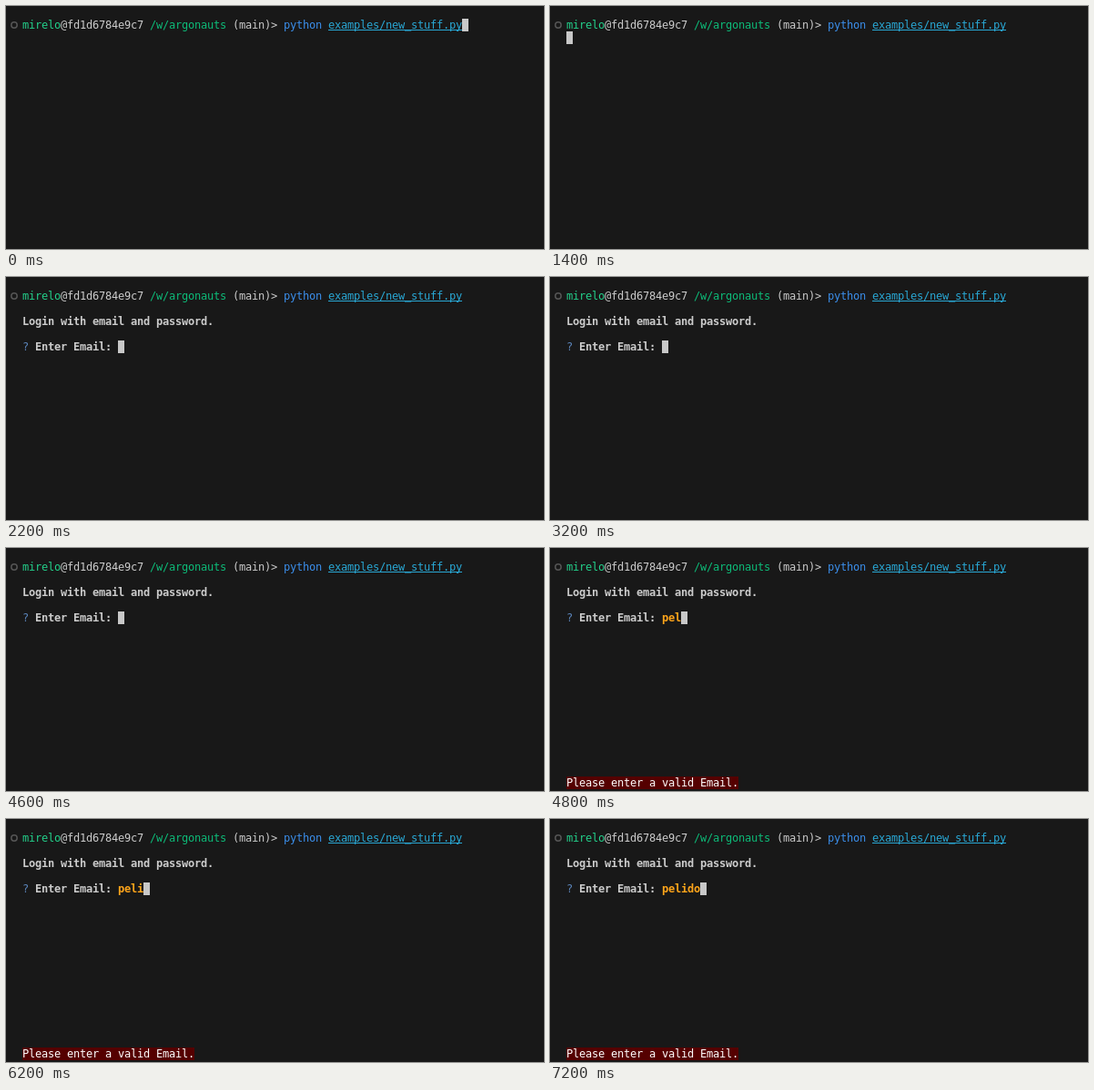
These frames come from a looping animation (591 by 268 pixels, 8000 ms). An HTML page:

```html
<!DOCTYPE html>
<html lang="en">
<head>
<meta charset="utf-8">
<title>Terminal login</title>
<style>
  html, body { margin: 0; width: 100%; height: 100%; overflow: hidden; background: #181818; }
  #dot { position: absolute; left: 5px; top: 17px; }
  #term {
    position: absolute; left: 18px; top: 14px; margin: 0;
    font: 12px/14px "DejaVu Sans Mono", monospace;
    letter-spacing: calc(7px - 1ch); /* snap to a 7px cell */
    color: #ccc; white-space: pre;
  }
  #term > div { position: absolute; left: 0; height: 14px; }
  .user { color: #23d18b; }
  .path { color: #0dbc79; }
  .cmd { color: #3b8eea; }
  .arg { color: #29a8d5; text-decoration: underline 1px; text-underline-offset: 1px; text-decoration-skip-ink: none; }
  .mark { color: #5a83b8; font-weight: normal; }
  #term b i { color: #ffa51a; font-style: normal; }
  #term #error { background: #550000; color: #fff; top: 238px; }
  #term #cursor { width: 7px; background: #c8c8c8; }
</style>
</head>
<body>
<svg id="dot" width="8" height="8"><circle cx="4" cy="4" r="3.2" fill="none" stroke="#555" stroke-width="1.5"/></svg>
<div id="term">
  <div style="top:0"><span class="user">mirelo</span>@fd1d6784e9c7 <span class="path">/w/argonauts</span> (main)&gt; <span class="cmd">python</span> <span class="arg">examples/new_stuff.py</span></div>
  <div id="form" style="top:28px"><b>Login with email and password.

<span class="mark">?</span> Enter Email: <i id="email"></i></b></div>
  <div id="error">Please enter a valid Email.</div>
  <div id="cursor"></div>
</div>
<script>
const LOOP = 8000, CELL_W = 7, CELL_H = 14, INPUT_COL = 15;
// [start in ms, text in the email field]
const typing = [
  [1600, ""], [4800, "pel"], [5000, "peln"], [5200, "pelnd"], [5400, "peln"],
  [5600, "pel"], [6200, "peli"], [6400, "pelid"], [6600, "pelido"]
];
const [form, email, error, cursor] =
  ["form", "email", "error", "cursor"].map(id => document.getElementById(id));

function show(el, on) {
  el.style.visibility = on ? "visible" : "hidden";
}

function moveCursor(col, row) {
  cursor.style.left = col * CELL_W + "px";
  cursor.style.top = row * CELL_H + "px";
}

function draw(t) {
  const step = typing.findLast(([start]) => t >= start);
  const text = step ? step[1] : "";
  show(form, step);
  show(error, text);
  if (email.textContent !== text) email.textContent = text;
  if (step) moveCursor(INPUT_COL + text.length, 4);
  else if (t >= 1400) moveCursor(0, 1);
  else moveCursor(69, 0);
}

const begin = performance.now();
function tick() {
  draw((performance.now() - begin) % LOOP);
  requestAnimationFrame(tick);
}
tick();
</script>
</body>
</html>
```
